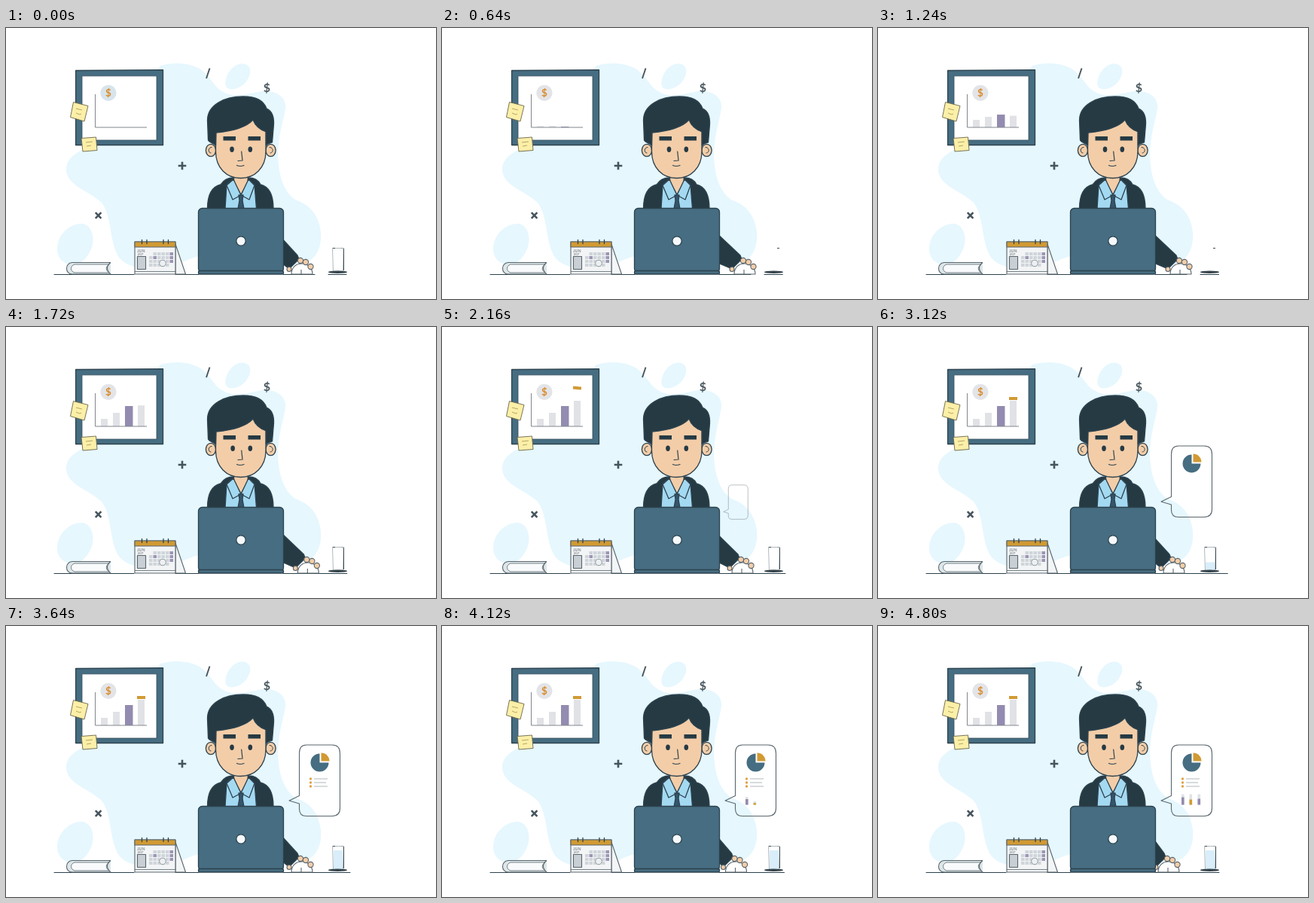
These frames come from a looping animation (571x360 px, 5.32 s). An HTML page:

```html
<!DOCTYPE html>
<html lang="en">
<head>
<meta charset="utf-8">
<title>Office desk</title>
<style>
  html, body { margin: 0; width: 100%; height: 100%; overflow: hidden; background: #fff; }
  svg { display: block; width: 100vw; height: 100vh; }
  text { font-family: Lato, "Open Sans", sans-serif; text-anchor: middle; }
  .ink { stroke: #2c424e; stroke-width: 1.3; stroke-linejoin: round; stroke-linecap: round; }
  .grey { stroke: #5a666d; stroke-width: 1.1; stroke-linejoin: round; }
  .line { fill: none; }
  .sky { fill: #e6f7fe; }
  .dark { fill: #263a44; }
  .teal { fill: #466d81; }
  .skin { fill: #f3cda8; }
  .gold { fill: #d19a33; }
  .note { fill: #fcefa8; stroke: #6b654c; stroke-width: .9; }
</style>
</head>
<body>
<svg viewBox="0 0 571 360">
  <g class="sky">
    <path d="M205 50C222 45 243 46 257 54C275 65 275 84 300 89C322 91 334 82 350 84C366 87 372 96 371 107C368 125 361 145 361 170C362 193 367 216 384 228C404 235 415 248 418 271C420 296 408 314 385 314L300 302C255 296 246 308 218 317C190 323 164 320 151 306C136 286 142 249 126 231C106 214 80 209 80 187C81 166 105 163 126 148Z"/>
    <path d="M68 293C68 274 86 259 101 260C114 262 118 278 114 291C109 305 99 316 85 314C73 312 68 303 68 293Z"/>
    <path d="M291.5 72C293 58 303 48 313 47.5C324 47 327 57 322 66C317 77 305 83 297 81C293 80 291 77 291.5 72Z"/>
  </g>

  <g stroke="#46545c" stroke-width="2.6" fill="none">
    <path d="M266 67L270.5 53.5" stroke-width="1.9"/>
    <path d="M228.7 183H239.3M234 177.8V188.2"/>
    <path d="M118.8 245.2L126.4 252.8M126.4 245.2L118.8 252.8"/>
  </g>
  <text x="346.5" y="84.5" font-size="16" font-weight="700" fill="#46545c">$</text>

  <!-- wall board -->
  <path class="teal ink" d="M92.6 56.5L208.5 55.6V155.5H92.6Z"/>
  <path d="M101 63.8H200V149H101Z" fill="#fff" stroke="#35505e" stroke-width=".8"/>
  <g id="bars"></g>
  <path d="M118.5 88V132H187" fill="none" stroke="#80868c" stroke-width="1"/>
  <rect id="cap" class="gold" x="174" y="93" width="11" height="4"/>
  <g id="coin">
    <circle id="disc" r="10.6"/>
    <text y="4.8" font-size="13.5" font-weight="700" fill="#d98b2b">$</text>
  </g>
  <path class="note" d="M89.5 98.5L109 103.5L104 124L85.5 118.5Z"/>
  <path class="note" d="M100 146.5L119.5 145L121 162.5L102 164Z"/>
  <path d="M93 107L101 109M93 113L98 115L100 114M106 152L115 151M107 157L113 156" fill="none" stroke="#b5a766"/>

  <!-- desk -->
  <g class="ink line" stroke-linecap="butt">
    <path d="M64 327.5H170M225 327.5H256M368 327.5H410" stroke-width="1"/>
    <path id="edge" stroke-width="1"/>
  </g>
  <g class="grey">
    <path d="M139 311.5H88C78 312 78 327 88 327H139" fill="#dde7ea"/>
    <path d="M137 314H91C85 316 85 323 91 325H137C132 322 132 317 137 314Z" fill="#f8fafb" stroke-width=".8"/>
    <path class="line" d="M139 311.5C133 316 133 322 139 327"/>
  </g>

  <!-- calendar -->
  <g class="grey">
    <path d="M225 287L238.5 327H225Z" fill="#f3f5f6"/>
    <path d="M171 284H225V327H171Z" fill="#f2f4f5"/>
    <path class="gold" d="M171 284H225V291H171Z"/>
    <path d="M171 323.5H225" stroke-width=".8"/>
    <path d="M174.5 303.5H185.5V320.5H174.5Z" fill="#c9d0d5"/>
    <path class="ink" d="M180.5 281.5V286.5M187 281.5V286.5M209 281.5V286.5M215.5 281.5V286.5"/>
  </g>
  <g font-size="5.4" fill="#59666e"><text x="179.5" y="298">JUN</text><text x="178.5" y="302.4" font-size="4.5">207</text></g>
  <g id="days"></g>
  <circle cx="208" cy="312.5" r="4.3" fill="#edf0f2" stroke="#7b858b" stroke-width=".8"/>

  <!-- man -->
  <g class="ink">
    <path class="dark" d="M267.5 240C267.5 222 273 211 285 208C289 202 296 199 302 199H322C329 199 335 202 338 208C350 211 355 222 355 240Z"/>
    <path d="M291 240L293 208L302 200H321L330 208L332.5 240Z" fill="#a4d9f2"/>
    <path class="skin" d="M303 192H321V204L312 221L303 204Z" stroke-width=".9"/>
    <path d="M302 201L312 222L301 228L293 209ZM322 201L312 222L323 228L330 209Z" fill="#a4d9f2"/>
    <path d="M309 222H315L314 229L316 240H308L310 229Z" fill="#34556b"/>
    <ellipse class="skin" cx="272" cy="162.5" rx="6.6" ry="8.2"/>
    <ellipse class="skin" cx="351.5" cy="162.5" rx="6.6" ry="8.2"/>
    <path class="line" d="M273 158.5C268 158.5 268 166 272 166M350 158.5C355.500 158.5 355.5 166 351 166" stroke-width="1"/>
    <path class="skin" d="M278.5 118H345V164C345 186 330 199.5 311.7 199.5C293 199.5 278.5 186 278.5 164Z"/>
    <path class="dark" d="M278.500 156.500C276 152 270 153 268.500 149L267.500 122C268 102 290 91 315 91C332 91 342 96 346 107C353 110 356 117 355.500 128L353.500 152C350 153 347 154 345.500 156V138C337 135 331 130 328 122C318 133 300 137 279 139Z"/>
    <path class="line" d="M312.700 164L314 176L308 176.500M306.500 182.500Q311 184.500 316 182.500" stroke-width="1.2"/>
  </g>
  <g class="dark">
    <path d="M288.500 144H305V149.500H288.500ZM321.500 144H338V149.500H321.500Z"/>
    <ellipse id="eye" cx="300" cy="161.300" rx="2.8" ry="3.700"/>
    <ellipse cx="324.300" cy="161.300" rx="2.8" ry="3.700"/>
  </g>

  <!-- arm and mouse -->
  <path id="arm" class="dark ink"/>
  <g id="hand" class="grey">
    <path d="M379 327C379 318 385 313 393 313C401 313 407 319 407 327Z" fill="#fff"/>
    <path d="M392 321V327"/>
    <circle class="skin" cx="391" cy="309" r="3.600"/>
    <circle class="skin" cx="398" cy="311" r="3.600"/>
    <circle class="skin" cx="404.500" cy="317" r="3.600"/>
    <circle class="skin" cx="376" cy="320.500" r="3"/>
  </g>

  <!-- laptop -->
  <g class="ink">
    <rect class="teal" x="255.5" y="239.5" width="113" height="85" rx="5"/>
    <rect class="teal" x="255.5" y="322.5" width="113" height="4.5" rx="2"/>
    <circle cx="312" cy="283" r="6.2" fill="#f5f9fb"/>
  </g>

  <!-- glass -->
  <path d="M445 292.5H448" stroke="#3c4a52"/>
  <g id="glass">
    <path d="M433.5 292.5H448.5L447.5 323H434.5Z" fill="#fff" stroke="#9ca7ad" stroke-width=".8"/>
    <path d="M448.5 293V322M434 292.5H437" stroke="#3c4a52"/>
    <path id="water" d="M435 298H447V323H435Z" fill="#d9eefa"/>
  </g>
  <ellipse cx="440.5" cy="324.3" rx="12.5" ry="1.7" fill="#35434b"/>

  <!-- speech bubble -->
  <g id="bubble">
    <path class="line grey" d="M399 158H433Q443.5 158 443.5 169V242Q443.5 252.5 433 252.5H399Q389.5 252.5 389.5 243V236L376 232L389.5 225.5V169Q389.5 158 399 158Z"/>
    <g id="pie">
      <path class="teal" d="M0 0V-12A12 12 0 1 0 12 0Z"/>
      <path class="gold" d="M2 -2V-13A11 11 0 0 1 13 -2Z"/>
    </g>
    <g id="list"></g>
    <g id="mini"></g>
  </g>
</svg>
<script>
const LOOP = 5320, STEP = 40;
const $ = id => document.getElementById(id);
const set = (el, attrs) => { for (const k in attrs) el.setAttribute(k, attrs[k]); return el; };
const add = (parent, tag, attrs) =>
  parent.appendChild(set(document.createElementNS('http://www.w3.org/2000/svg', tag), attrs));

// Linear value from [time, value] pairs
function track(t, keys) {
  if (t <= keys[0][0]) return keys[0][1];
  for (let i = 1; i < keys.length; i++) {
    const [t0, a] = keys[i - 1], [t1, b] = keys[i];
    if (t < t1) return a + (b - a) * (t - t0) / (t1 - t0);
  }
  return keys[keys.length - 1][1];
}
const ramp = (t, start, end) => Math.min(1, Math.max(0, (t - start) / (end - start)));
const easeOut = p => 1 - (1 - p) ** 3;

// x, full height, start, end, colour
const bars = [
  [126, 10, 540, 1100, '#e1e2e6'],
  [142, 18, 540, 1440, '#e1e2e6'],
  [158, 27, 600, 1620, '#938bb0'],
  [175, 34, 640, 1960, '#e1e2e6']
].map(([x, h, start, end, fill], i) => ({
  h, start, end, el: add($('bars'), 'rect', { x, width: i == 2 ? 10.5 : 9, fill })
}));

for (let i = 0; i < 24; i++) {
  const col = i % 6, row = i / 6 | 0;
  if (row == 0 && col == 0 || row == 3 && col > 4) continue;
  const fill = (col == 5 && row < 3) || (col == 1 && row == 1) ? '#9c95b5' : '#cfd5da';
  add($('days'), 'rect', { x: 190 + col * 5.5, y: 298 + row * 5, width: 4.5, height: 4, fill });
}

const rows = [203, 208, 213].map((y, i) => {
  const g = add($('list'), 'g', {});
  add(g, 'circle', { cx: 404.5, cy: y, r: 1.7, fill: '#e0a14a' });
  add(g, 'path', { d: `M409 ${y}H${i == 1 ? 425 : 427}`, stroke: '#c2c7cb', 'stroke-width': 1.3 });
  return g;
});

const minis = [[403, 10, '#938bb0'], [413.5, 7, '#d19a33'], [424.5, 8, '#938bb0']].map(([x, h, fill]) => ({
  h,
  back: add($('mini'), 'rect', { x, width: 3.6, fill: '#dfe2e5' }),
  front: add($('mini'), 'rect', { x, width: 3.6, fill })
}));

const grow = (el, base, height) => set(el, { y: base - height, height });

function draw(t) {
  for (const b of bars) grow(b.el, 132, b.h * ramp(t, b.start, b.end));

  const drop = track(t, [[1960, -22], [2160, -14], [2640, -3.6], [2840, 0]]);
  const tilt = track(t, [[2160, 6], [2560, 0]]);
  set($('cap'), { transform: `translate(0 ${drop}) rotate(${tilt} 179.5 95)`, opacity: ramp(t, 1960, 2120) });

  const spin = Math.abs(Math.cos(Math.PI * ramp(t, 2400, 3120)));
  set($('coin'), { transform: `translate(136 86.3) scale(${Math.max(spin, .06)} 1)` });
  set($('disc'), { fill: t < 560 ? '#d8e4ec' : '#e3e4e7' });

  const dx = track(t, [[0, 0], [560, 9], [1600, 9], [2160, 6], [2600, 0], [3800, 0], [4700, -7]]);
  set($('hand'), { transform: `translate(${dx} 0)` });
  set($('arm'), { d: `M366 ${279 - dx * .6}L${387 + dx} 302L${389 + dx} 307L${376 + dx} 320L366 312Z` });
  set($('eye'), { cx: 300 + track(t, [[200, 0], [600, 1.5], [1600, 1.5], [2100, 0]]) });

  const glassOn = t < 40 || t >= 1720;
  const end = track(t, [[0, 452], [2080, 453], [2160, 456], [2240, 504], [2300, 509], [2640, 471], [3640, 457], [4400, 453]]);
  set($('edge'), { d: `M${t >= 1720 ? 410 : 428} 327.5H${end}` });

  set($('glass'), { opacity: glassOn ? 1 : 0 });
  const level = ramp(t, 2800, 3560);
  set($('water'), { transform: `translate(0 ${323 * (1 - level)}) scale(1 ${level})` });

  const s = ramp(t, 1900, 2440);
  set($('bubble'), {
    transform: `translate(371.7 258) scale(${s}) translate(-371.7 -258)`,
    opacity: ramp(t, 1900, 2240)
  });
  set($('pie'), { transform: `translate(416.5 181.5) scale(${easeOut(ramp(t, 2720, 3200))})` });
  rows.forEach((g, i) => set(g, { opacity: ramp(t, 3120 + i * 120, 3400 + i * 120) }));
  minis.forEach((m, i) => {
    const p = ramp(t, 3760 + i * 200, 4240 + i * 200);
    grow(m.back, 237.5, 14 * p);
    grow(m.front, 237.5, m.h * p);
  });
}

const begin = performance.now();
function tick() {
  const t = (performance.now() - begin) % LOOP;
  draw(Math.floor(t / STEP) * STEP);
  requestAnimationFrame(tick);
}
tick();
</script>
</body>
</html>
```
